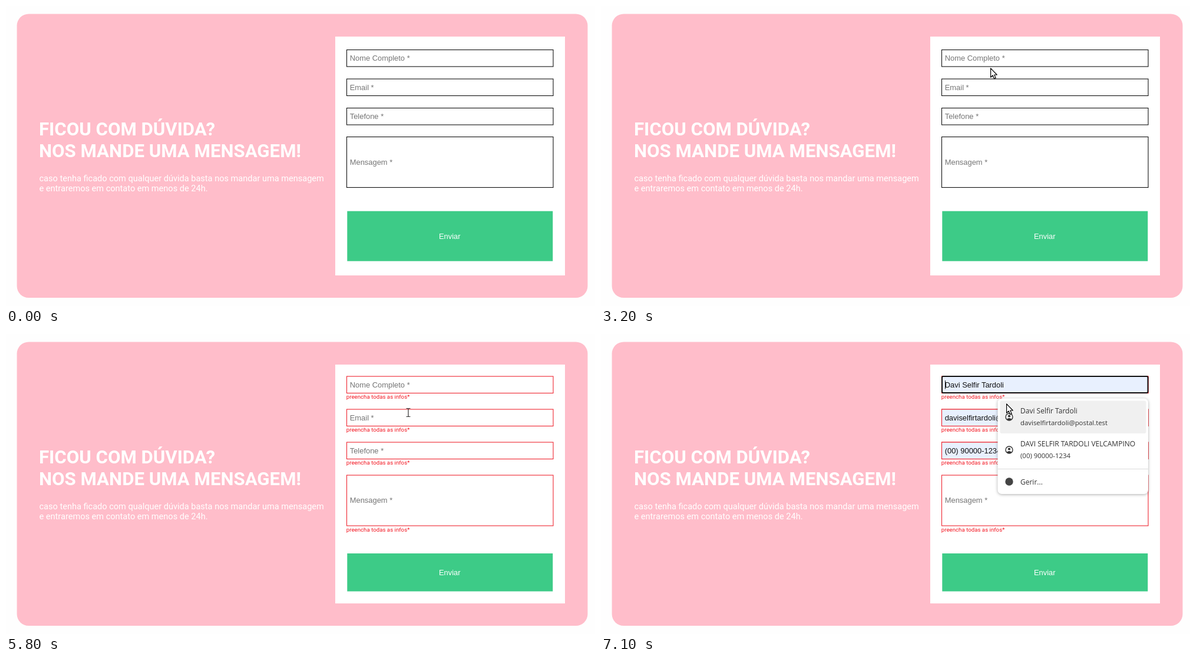
These frames come from a looping animation (1000x510 px, 7200 ms). An HTML page:

```html
<!DOCTYPE html>
<html lang="pt">
<head>
<meta charset="utf-8">
<title>Formulário de contato</title>
<style>
  html, body { margin: 0; width: 100%; height: 100%; overflow: hidden; background: #fefefe; }
  svg { display: block; width: 1000px; height: 510px; }
  text { white-space: pre; }
  .title { font: 700 31.2px Roboto, sans-serif; fill: #fff; }
  .lead { font: 14.55px Roboto, sans-serif; fill: #fff; }
  .input { font: 12.93px "Liberation Sans", Arial, sans-serif; fill: #757575; }
  .filled { fill: #111; }
  .send { font: 12.93px "Liberation Sans", Arial, sans-serif; fill: #fff; text-anchor: middle; }
  .error { font: 9.7px Roboto, sans-serif; fill: #f3141f; }
  .entry { font: 12px "Open Sans", sans-serif; fill: #333; }
  .detail { font: 11.4px "Open Sans", sans-serif; fill: #333; }
  .menu { filter: drop-shadow(0 1px 2.5px rgba(0, 0, 0, .32)); }
</style>
</head>
<body>
<svg id="stage" viewBox="0 0 1000 510">
  <rect x="18.5" y="13.5" width="969" height="482.5" rx="20" fill="#ffbdca"/>
  <text class="title" x="56" y="220.3">FICOU COM DÚVIDA?</text>
  <text class="title" x="56" y="257.2">NOS MANDE UMA MENSAGEM!</text>
  <text class="lead" x="56.5" y="297.5">caso tenha ficado com qualquer dúvida basta nos mandar uma mensagem</text>
  <text class="lead" x="56.5" y="314.8">e entraremos em contato em menos de 24h.</text>
  <rect x="559" y="52" width="390" height="406" fill="#fff"/>
  <g id="clean"></g>
  <g id="invalid"></g>
  <g id="preview"></g>
  <g id="focus"></g>
  <g id="menu">
    <rect class="menu" x="673.5" y="109.5" width="255.5" height="162.5" rx="7" fill="#fff"/>
    <rect id="hover" x="677.5" y="113.5" width="248" height="55.5" rx="3" fill="#f0f0f0"/>
    <path d="M673.5 229.5H929" stroke="#dcdcdc"/>
    <circle cx="693" cy="251" r="6.7" fill="#444"/>
    <text class="entry" x="712" y="255.5">Gerir...</text>
  </g>
  <path id="arrow" d="M.6 .8V16.3L4.1 13 6.6 18.6 9.2 17.5 6.8 12H11.3Z" fill="#fff" stroke="#000" stroke-width="1.2" stroke-linejoin="round"/>
  <path id="beam" d="M-3.5 -7H-1Q0 -7 0 -6Q0 -7 1 -7H3.5M0 -6V6M-3.5 7H-1Q0 7 0 6Q0 7 1 7H3.5" fill="none" stroke="#333" stroke-width="1.2"/>
</svg>
<script>
const LOOP = 7200, STEP = 100;
const SHOW_CURSOR = 400, SUBMIT = 4200, FOCUS = 6800, FILL = 7000;
const LABELS = ["Nome Completo *", "Email *", "Telefone *", "Mensagem *"];
const PERSON = "Davi Selfir Tardoli";
const MAIL = "daviselfirtardoli@postal.test";
const PHONE = "(00) 90000-1234";
const LEFT = 578.5, WIDTH = 350.5, ROW = 28.5, AREA = 86;
const CLEAN = { tops: [74.5, 124, 173.5, 222.5], button: [348.7, 85], color: "#111" };
const INVALID = { tops: [72, 128, 184, 240], button: [373, 64.5], color: "#ee2530" };

// time, x, y
const PATH = [
  [400, 985, 498], [600, 868, 408], [800, 757, 322], [900, 738, 297],
  [1100, 724, 262], [1400, 686, 168], [1700, 661, 105], [3500, 661, 105],
  [3600, 666, 135], [3800, 704, 320], [4000, 716, 387], [5100, 716, 387],
  [5300, 700, 250], [5500, 686, 149], [5700, 684, 140], [5900, 682, 127],
  [6100, 682, 127], [6200, 676, 121], [6500, 676, 121], [6700, 681, 91],
  [6900, 683, 92], [7000, 688, 114], [7100, 688, 118]
];

const $ = id => document.getElementById(id);

function add(parent, tag, attrs, content = "") {
  const node = document.createElementNS("http://www.w3.org/2000/svg", tag);
  for (const key in attrs) node.setAttribute(key, attrs[key]);
  node.textContent = content;
  parent.append(node);
}

const label = (parent, cls, x, y, content) => add(parent, "text", { class: cls, x, y }, content);
const fieldHeight = i => i === 3 ? AREA : ROW;

function field(parent, layout, i, content, filled) {
  const y = layout.tops[i], height = fieldHeight(i);
  add(parent, "rect", {
    x: LEFT, y, width: WIDTH, height,
    fill: filled ? "#e8f0fe" : "#fff", stroke: layout.color, "stroke-width": 1.1
  });
  label(parent, filled ? "input filled" : "input", 583.7, y + height / 2 + 4.3, content);
}

function form(parent, layout) {
  LABELS.forEach((content, i) => {
    field(parent, layout, i, content, false);
    if (layout === INVALID)
      label(parent, "error", 577.8, layout.tops[i] + fieldHeight(i) + 9.6, "preencha todas as infos*");
  });
  const [y, height] = layout.button;
  add(parent, "rect", { x: 579.3, y, width: 349, height, fill: "#3dcb87" });
  label(parent, "send", 753.3, y + height / 2 + 4.6, "Enviar");
}

function profile(y, name, detail) {
  const menu = $("menu");
  add(menu, "circle", { cx: 693, cy: y, r: 6, fill: "none", stroke: "#333", "stroke-width": 1.4 });
  add(menu, "circle", { cx: 693, cy: y - 1.5, r: 2.1, fill: "#333" });
  add(menu, "path", { d: `M688.8 ${y + 4}q4.2 -4 8.4 0q-4.2 4 -8.4 0`, fill: "#333" });
  label(menu, "entry", 712, y - 5.8, name);
  label(menu, "detail", 712, y + 14.4, detail);
}

form($("clean"), CLEAN);
form($("invalid"), INVALID);
[PERSON, MAIL, PHONE].forEach((content, i) => field($("preview"), INVALID, i, content, true));
add($("focus"), "rect", {
  x: 579, y: 72, width: 349.5, height: 28, rx: 2, fill: "none", stroke: "#101010", "stroke-width": 2
});
add($("focus"), "path", { d: "M584.5 79V93.5", stroke: "#111" });
profile(141, PERSON, MAIL);
profile(197, "DAVI SELFIR TARDOLI VELCAMPINO", PHONE);

function cursorAt(t) {
  const next = PATH.findIndex(point => point[0] >= t);
  if (next < 1) return PATH[0].slice(1);
  const [t0, x0, y0] = PATH[next - 1], [t1, x1, y1] = PATH[next];
  const k = (t - t0) / (t1 - t0);
  return [x0 + (x1 - x0) * k, y0 + (y1 - y0) * k];
}

const show = (id, on) => $(id).style.visibility = on ? "visible" : "hidden";

function render(t) {
  const failed = t >= SUBMIT, focused = t >= FOCUS, filled = t >= FILL;
  show("clean", !failed);
  show("invalid", failed);
  show("preview", filled);
  show("focus", focused);
  show("menu", focused);
  show("hover", filled);

  const [x, y] = cursorAt(t);
  const tops = (failed ? INVALID : CLEAN).tops;
  const overField = !filled && x > LEFT && x < LEFT + WIDTH &&
    tops.some((top, i) => y >= top && y <= top + fieldHeight(i));
  show("arrow", t >= SHOW_CURSOR && !overField);
  show("beam", t >= SHOW_CURSOR && overField);
  for (const id of ["arrow", "beam"]) $(id).setAttribute("transform", `translate(${x} ${y})`);
}

const start = performance.now();
function tick() {
  const elapsed = Math.max(0, performance.now() - start) % LOOP;
  render(Math.floor(elapsed / STEP) * STEP);
  requestAnimationFrame(tick);
}
tick();
</script>
</body>
</html>
```
